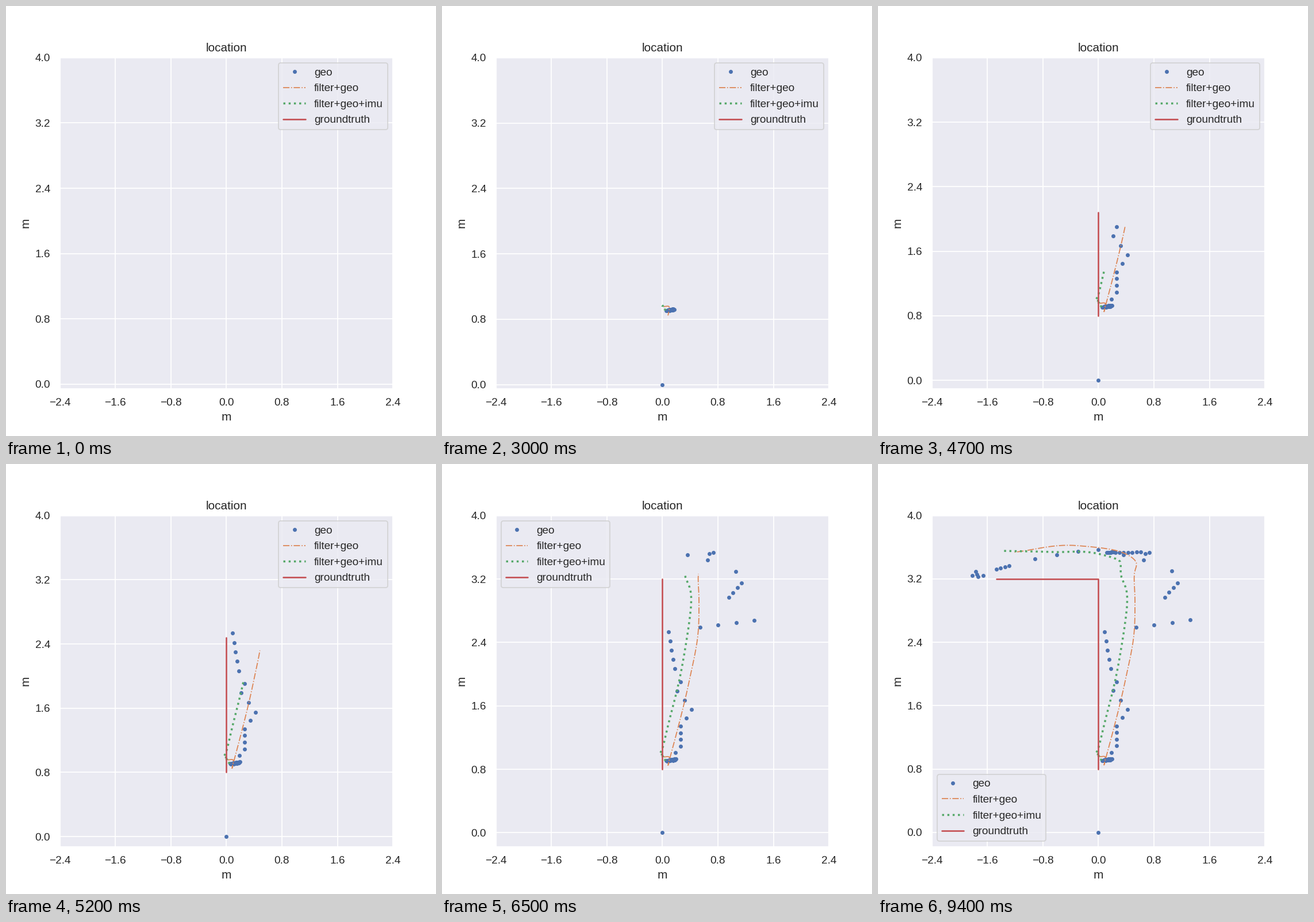
Recreate the animation shown at these times as a matplotlib script. Size 748 by 748 pixels, loop 9500 ms.

```python
import numpy as np
import matplotlib.pyplot as plt
from matplotlib.animation import FuncAnimation

FRAMES, STEP = 95, 100
INK, PANEL = ".15", "#EAEAF2"
BLUE, ORANGE, GREEN, RED = "#4C72B0", "#DD8452", "#55A868", "#C44E52"

plt.rcParams.update({
    "font.family": "Liberation Sans", "font.size": 12,
    "axes.titlesize": 12, "axes.labelsize": 12,
    "xtick.labelsize": 11, "ytick.labelsize": 11, "legend.fontsize": 11,
    "text.color": INK, "axes.labelcolor": INK,
    "xtick.color": INK, "ytick.color": INK,
    "axes.facecolor": PANEL, "axes.edgecolor": "white",
    "axes.linewidth": 1.25, "axes.axisbelow": True,
    "axes.grid": True, "grid.color": "white", "grid.linewidth": 1,
    "xtick.major.size": 6, "ytick.major.size": 6,
    "xtick.bottom": False, "ytick.left": False,
    "lines.solid_capstyle": "round",
})


def resting(count=37, dropout=15):
    """Noisy readings before the walk, with one lost reading at zero."""
    rng = np.random.default_rng(4)
    x = np.linspace(0.06, 0.185, count) + rng.uniform(-0.015, 0.02, count)
    y = 0.902 + 0.14 * (x - 0.05) + rng.uniform(-0.006, 0.01, count)
    x[dropout - 1] = y[dropout - 1] = 0
    return np.column_stack([x, y])


def hop(keys):
    """Straight, even steps between (step, x, y) keys."""
    t, x, y = np.array(keys).T
    n = np.arange(t[0], t[-1] + 1)
    return np.column_stack([np.interp(n, t, x), np.interp(n, t, y)])


def glide(keys):
    """Smooth cubic path through (step, x, y) keys."""
    keys = np.array(keys)
    t, p = keys[:, 0], keys[:, 1:]
    slope = np.gradient(p, t, axis=0)
    n = np.arange(t[0], t[-1] + 1)
    i = np.clip(np.searchsorted(t, n, side="right") - 1, 0, len(t) - 2)
    h = (t[i + 1] - t[i])[:, None]
    s = (n - t[i])[:, None] / h
    ease = s * s * (3 - 2 * s)
    bend = s * (1 - s) * h * ((1 - s) * slope[i] - s * slope[i + 1])
    return p[i] + ease * (p[i + 1] - p[i]) + bend


def truth(n):
    """Straight up, a pause at the corner, then left."""
    if n <= 31:
        return np.empty((0, 2))
    top = 0.8 + 0.08 * min(n - 31, 30)
    points = [(0, 0.8), (0, top)]
    if n > 71:
        points.append((-0.064 * (n - 71), top))
    return np.array(points)


geo = np.vstack([resting(), hop([
    (38, .185, 1.008), (39, .266, 1.091), (42, .266, 1.343),
    (44, .423, 1.551), (46, .216, 1.788), (47, .266, 1.903),
    (48, .179, 2.067), (52, .088, 2.534), (53, .543, 2.59),
    (56, 1.321, 2.681), (57, .957, 2.971), (60, 1.139, 3.147),
    (61, 1.061, 3.298), (62, .655, 3.439), (63, .733, 3.533),
    (64, .672, 3.517), (65, .361, 3.506), (66, .61, 3.538),
    (74, .12, 3.535), (81, .24, 3.54), (82, 0, 3.573), (83, -.293, 3.55),
    (85, -.912, 3.455), (86, -1.284, 3.365), (89, -1.468, 3.32),
    (90, -1.663, 3.243), (91, -1.82, 3.243), (92, -1.766, 3.292),
    (94, -1.733, 3.23),
])])
orange = glide([
    (1, .02, .955), (12, .095, .955), (24, .09, .88), (32, .09, .88),
    (47, .386, 1.911), (54, .51, 2.48), (60, .527, 2.93), (65, .518, 3.265),
    (68, .548, 3.4), (72, .386, 3.52), (80, -.29, 3.62), (94, -1.22, 3.537),
])
green = glide([
    (1, .05, .91), (22, 0, .955), (30, .02, .99), (33, -.035, .985),
    (39, 0, 1.06), (47, .088, 1.375), (53, .28, 2.08), (58, .413, 2.86),
    (65, .322, 3.27), (68, .312, 3.42), (70, .25, 3.455), (73, 0, 3.518),
    (82, -.64, 3.54), (94, -1.395, 3.555),
])

fig = plt.figure(figsize=(6, 6), dpi=748 / 6, facecolor="white")
ax = fig.add_subplot()
ax.set(title="location", xlabel="m", ylabel="m", xlim=(-2.4, 2.4))
ax.set_xticks([0.8 * k for k in range(-3, 4)])
ax.set_yticks([0.8 * k for k in range(6)])

lines = [
    ax.plot([], [], style, color=color, lw=width, label=label)[0]
    for style, color, width, label in [
        (".", BLUE, 1, "geo"),
        ("-.", ORANGE, 1, "filter+geo"),
        (":", GREEN, 2, "filter+geo+imu"),
        ("-", RED, 1.5, "groundtruth"),
    ]
]
ax.legend(loc="best", labelspacing=0.54, borderpad=0.42)


def draw(n):
    parts = [geo[:n], orange[:n], green[:n], truth(n)]
    for line, part in zip(lines, parts):
        line.set_data(part[:, 0], part[:, 1])
    low = -0.055
    if n:
        y = np.concatenate([part[:, 1] for part in parts])
        low = min(0, y.min() - 0.05 * np.ptp(y))
    ax.set_ylim(low, 4)
    return lines


anim = FuncAnimation(fig, draw, frames=FRAMES, interval=STEP,
                     repeat=True, repeat_delay=0, blit=False)
plt.show()
```
